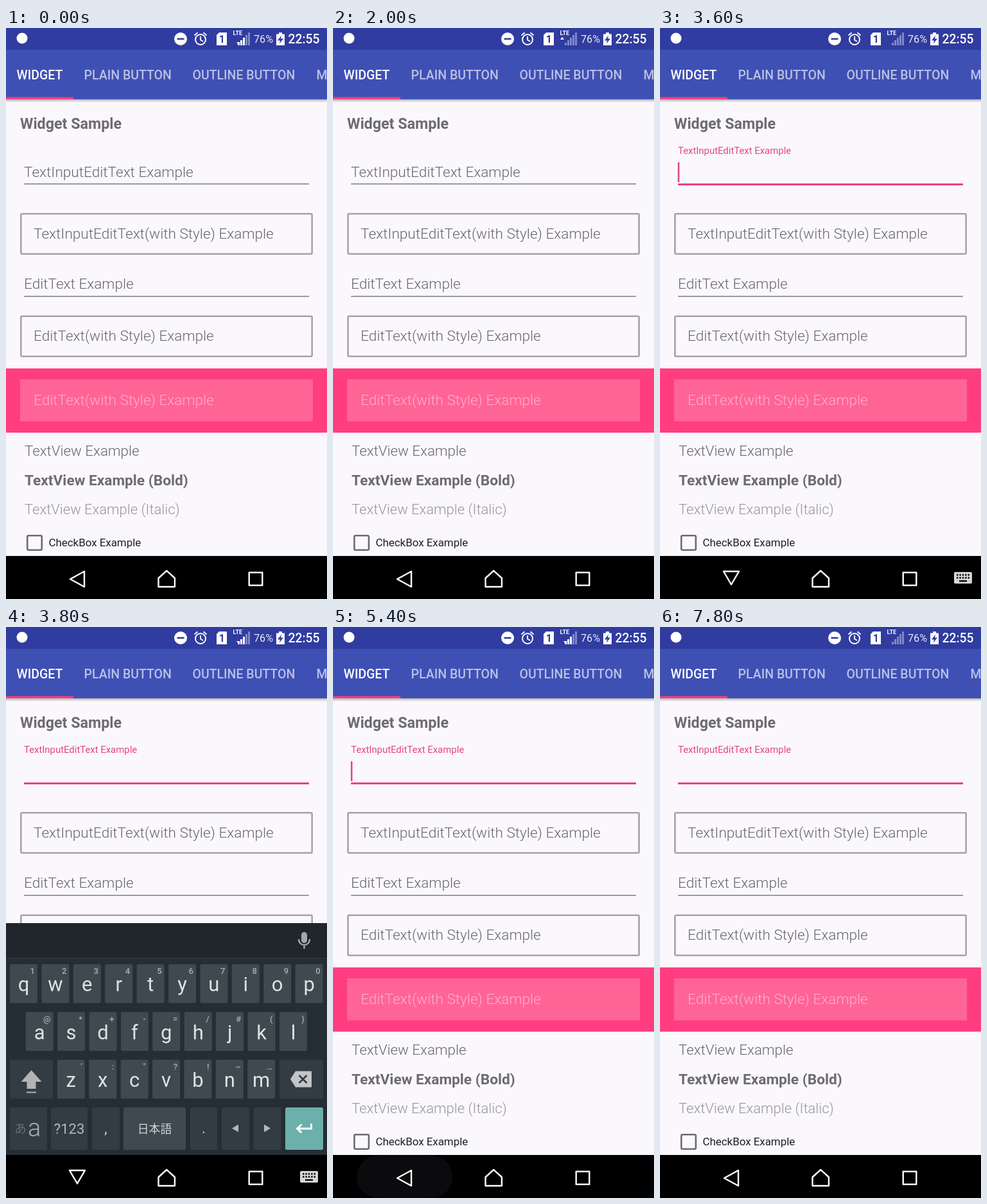
Write an HTML page that moves like this. It is 500 by 889 pixels and loops after 8000 ms.

```html
<!DOCTYPE html>
<html lang="en">
<head>
<meta charset="utf-8">
<title>Widget sample</title>
<style>
  html, body { margin: 0; width: 100%; height: 100%; overflow: hidden; background: #000; }
  svg { display: block; width: 100vw; height: 100vh; }
  text { font-family: Roboto, "Noto Sans CJK JP", "Noto Sans CJK", sans-serif; white-space: pre; }
  .field { font-size: 22.6px; font-weight: 300; fill: #69676c; }
  .bold { font-weight: 700; fill: #6d6b70; }
  .tab { font-size: 19.5px; font-weight: 500; fill: #b9c0e4; }
  .line { stroke: #7f7d82; stroke-width: 1.6; }
  .box { fill: none; stroke: #a5a3a8; stroke-width: 2.6; }
  .icon { fill: none; stroke: #fff; stroke-width: 2.4; stroke-linejoin: round; }
  .letter { font-size: 31px; fill: #e0e2e4; text-anchor: middle; }
  .hint { font-size: 13px; font-weight: 500; fill: #abb0b3; text-anchor: end; }
</style>
</head>
<body>
<svg viewBox="0 0 500 889">
  <defs>
    <linearGradient id="shade" x2="0" y2="1">
      <stop stop-color="#000" stop-opacity=".28"/>
      <stop offset="1" stop-color="#000" stop-opacity="0"/>
    </linearGradient>
  </defs>

  <rect width="500" height="822" fill="#faf8fc"/>
  <rect y="111" width="500" height="5" fill="url(#shade)"/>
  <rect width="500" height="34" fill="#303c9f"/>
  <rect y="34" width="500" height="77" fill="#3f50b5"/>
  <rect y="107.5" width="105" height="3.5" fill="#f2417d"/>

  <!-- Status bar -->
  <circle cx="25" cy="16" r="8.5" fill="#fff"/>
  <circle cx="272" cy="17" r="10" fill="#fff"/>
  <path d="M266.5 17h11" stroke="#303c9f" stroke-width="2.6"/>
  <g class="icon" style="stroke-width:2">
    <circle cx="303" cy="18" r="8"/>
    <path d="M303 13v5.5l4 2.5M293.5 11.5l5-4.2M312.5 11.5l-5-4.2"/>
  </g>
  <path d="M332 7h12v20h-16V11z" fill="#fff"/>
  <text x="336.3" y="23" font-size="16" font-weight="700" fill="#303c9f" text-anchor="middle">1</text>
  <text x="353.5" y="11" font-size="9" font-weight="700" fill="#fff">LTE</text>
  <g id="signal"></g>
  <path data-on="0-1400 3800-6600" d="M359 22h6l-3 4z" fill="#fff"/>
  <path data-on="2000-3000" d="M354 18h6l-3-4z" fill="#fff"/>
  <text x="386" y="23" font-size="16.2" fill="#e9ebf7">76%</text>
  <path d="M421 9.5h4V7h5v2.5h4V27h-13z" fill="#fff"/>
  <path d="M429 11.5l-6 8h4l-1 5 6-8h-4z" fill="#303c9f"/>
  <text x="439.5" y="24" font-size="19.3" font-weight="500" fill="#fff">22:55</text>

  <text class="tab" x="16.5" y="80" style="fill:#fff">WIDGET</text>
  <text class="tab" x="121.5" y="80">PLAIN BUTTON</text>
  <text class="tab" x="290.5" y="80">OUTLINE BUTTON</text>
  <text class="tab" x="483.5" y="80">MATERIAL</text>

  <!-- Form -->
  <text class="bold" x="22" y="157" font-size="23.3">Widget Sample</text>
  <g data-on="0-3400">
    <text class="field" x="28" y="232">TextInputEditText Example</text>
    <path class="line" d="M28 242.8h444"/>
  </g>
  <g data-on="3400-8000">
    <text id="label" x="28" fill="#e6457f">TextInputEditText Example</text>
    <path d="M28 243.4h444" stroke="#e9437e" stroke-width="3"/>
  </g>
  <path data-on="3600-3800 4200-4800 5200-5800 6200-6800 7400-7800"
        d="M29 209v31" stroke="#e9437e" stroke-width="2.6"/>
  <rect class="box" x="23.3" y="289.3" width="453.4" height="62.4" rx="2"/>
  <text class="field" x="43" y="328">TextInputEditText(with Style) Example</text>
  <text class="field" x="28" y="406">EditText Example</text>
  <path class="line" d="M28 417.8h444"/>
  <rect class="box" x="23.3" y="448.8" width="453.4" height="62.4" rx="2"/>
  <text class="field" x="43" y="487">EditText(with Style) Example</text>
  <rect y="530" width="500" height="100" fill="#ff3d7f"/>
  <rect x="22" y="547" width="456" height="65.5" rx="1" fill="#ff6497"/>
  <text class="field" x="43" y="587" style="fill:#ffb0ca">EditText(with Style) Example</text>
  <text class="field" x="29" y="666" style="font-size:22.3px">TextView Example</text>
  <text class="bold" x="29" y="712" font-size="22.7">TextView Example (Bold)</text>
  <text class="field" x="29" y="757" style="font-size:22px;fill:#98969b">TextView Example (Italic)</text>
  <rect x="33.2" y="790.2" width="22.6" height="22.6" rx="2" fill="none" stroke="#6d6b70" stroke-width="2.6"/>
  <text x="66.5" y="807" font-size="16.9" fill="#1f1e21">CheckBox Example</text>

  <!-- Keyboard -->
  <g data-on="3800-5400">
    <rect y="461" width="500" height="361" fill="#242e34"/>
    <rect y="461" width="500" height="54" fill="#20262b"/>
    <path d="M0 515.5h500" stroke="#2f393f"/>
    <rect x="460" y="475" width="9" height="17" rx="4.5" fill="#a4a8ab"/>
    <path d="M456 486c0 12 17 12 17 0M464.5 495v6" fill="none" stroke="#a4a8ab" stroke-width="2.4"/>
    <g id="keys"></g>
    <path d="M39.5 690l16 18h-9v11h-14v-11h-9z" fill="#b0b4b7"/>
    <path d="M32 724.5h15" stroke="#b0b4b7" stroke-width="2"/>
    <path d="M443 704l8-12.5h25v25h-25z" fill="#c2c5c7"/>
    <path d="M456.5 698l12 12m0-12l-12 12" stroke="#323c42" stroke-width="2.6"/>
    <text x="13" y="788" font-size="19" fill="#666f74">あ</text>
    <text x="34" y="793" font-size="38" font-weight="300" fill="#a9aeb1">a</text>
    <text x="98.5" y="789" font-size="22" text-anchor="middle" fill="#b4b8bb">?123</text>
    <text x="155.5" y="788" font-size="22" text-anchor="middle" fill="#d8dadc">,</text>
    <text x="231.5" y="788" font-size="17.8" text-anchor="middle" fill="#cfd2d4">日本語</text>
    <text x="308" y="788" font-size="22" text-anchor="middle" fill="#d8dadc">.</text>
    <path d="M352 780.5l10-6v12zM412 780.5l-10-6v12z" fill="#b4b8bb"/>
    <path d="M475.500 773v8h-22m7-6.500l-7 6.500 7 6.500" fill="none" stroke="#fff" stroke-width="3"/>
  </g>

  <!-- Navigation bar -->
  <rect y="822" width="500" height="67" fill="#000"/>
  <rect data-on="5200-5400" x="38" y="823" width="146" height="66" rx="33" fill="#1c1c1d"/>
  <rect data-on="5400-5600" x="37" y="823" width="149" height="66" rx="33" fill="#0b0b0d"/>
  <path class="icon" data-on="0-3400 5200-8000" d="M100 858l22-12v24z"/>
  <g data-on="3400-5200">
    <path class="icon" d="M99 846h24l-12 20.500z"/>
    <rect x="458" y="847" width="28" height="18" rx="2" fill="#d5d5d5"/>
    <path d="M462 851.500h21M462 856h21" stroke="#000" stroke-width="2.400" stroke-dasharray="2.400 2"/>
    <path d="M466 861h12" stroke="#000" stroke-width="2.400"/>
  </g>
  <path class="icon" d="M237.500 856.500l12.700-11.500 12.700 11.500v13.500h-25.400z"/>
  <rect class="icon" x="378.700" y="847.700" width="20.600" height="20"/>
</svg>

<script>
const LOOP = 8000;
const byId = id => document.getElementById(id);

const KEY = '#3f4a50', SIDE = '#323c42', PITCH = 49.4;
const keyRect = (x, y, w, h, fill = KEY) =>
  `<rect x="${x}" y="${y}" width="${w}" height="${h}" rx="2.5" fill="${fill}"/>`;

const letterRow = (letters, hints, left, top) => [...letters].map((letter, i) => {
  const x = left + i * PITCH;
  return keyRect(x, top, 43, 60.5) +
    `<text class="letter" x="${x + 21.5}" y="${top + 42}">${letter}</text>` +
    `<text class="hint" x="${x + 39}" y="${top + 15}">${hints[i]}</text>`;
}).join('');

byId('keys').innerHTML =
  letterRow('qwertyuiop', '1234567890', 6, 525) +
  letterRow('asdfghjkl', '@*+-=/#()', 30.7, 599.5) +
  letterRow('zxcvbnm', '\':"?!~…', 79.8, 673.7) +
  keyRect(6, 673.7, 67, 60.5, SIDE) + keyRect(426, 673.7, 68, 60.5, SIDE) +
  [[6, 58], [70, 57], [134, 43], [183, 97, KEY], [287, 42], [336, 43], [385.5, 43], [435, 59, '#6bb0aa']]
    .map(([x, w, fill = SIDE]) => keyRect(x, 748, w, 66, fill)).join('');

byId('signal').innerHTML = [0, 1, 2, 3, 4].map(i => {
  const height = 4 + i * 4;
  return `<rect x="${361 + i * 4}" y="${27 - height}" width="3" height="${height}"/>`;
}).join('');
const bars = [...byId('signal').children];

const timed = [...document.querySelectorAll('[data-on]')].map(node => ({
  node,
  spans: node.dataset.on.split(' ').map(span => span.split('-').map(Number))
}));
const within = (time, spans) => spans.some(([from, to]) => time >= from && time < to);
const strongSignal = [[0, 1400], [3800, 6600]];

function draw(time) {
  for (const { node, spans } of timed) {
    node.style.display = within(time, spans) ? '' : 'none';
  }
  const level = within(time, strongSignal) ? 3 : 0;
  bars.forEach((bar, i) => bar.setAttribute('fill', i < level ? '#fff' : '#7f88c5'));

  const settling = time < 3600;
  byId('label').setAttribute('y', settling ? 199 : 195.5);
  byId('label').setAttribute('font-size', settling ? 15.3 : 14.9);
}

const start = performance.now();
function tick() {
  draw((performance.now() - start) % LOOP);
  requestAnimationFrame(tick);
}
tick();
</script>
</body>
</html>
```
